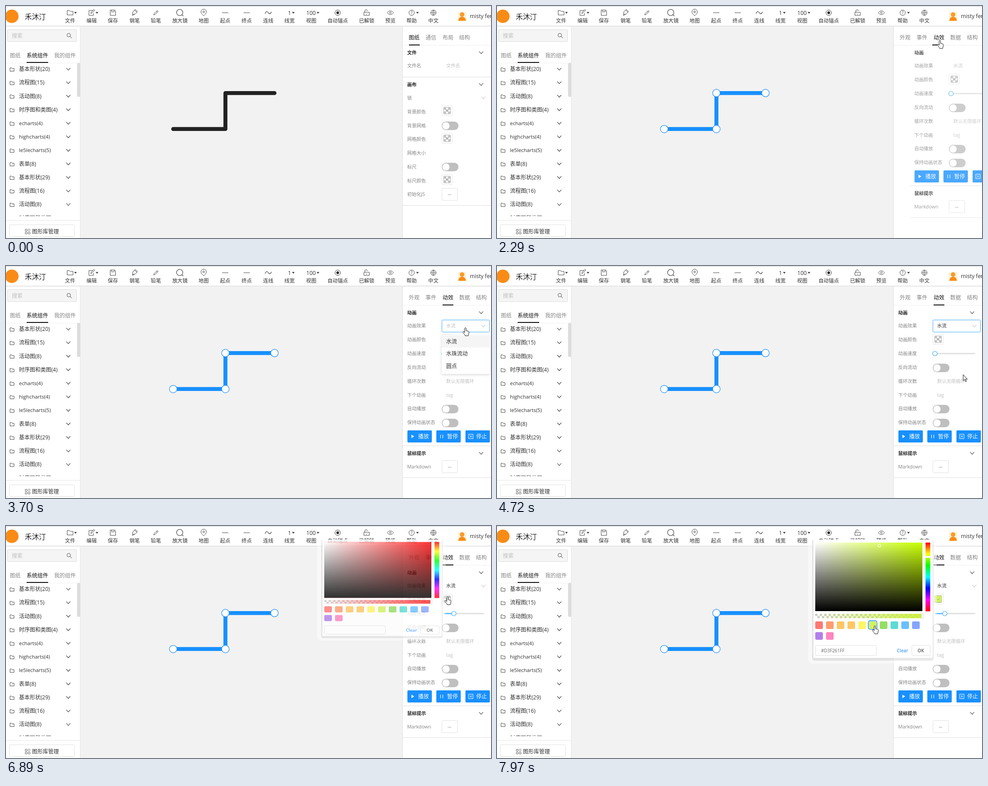
These frames come from a looping animation (1082x518 px, 8000 ms). An HTML page:

```html
<!DOCTYPE html>
<html lang="zh">
<head>
<meta charset="utf-8">
<title>Diagram editor</title>
<style>
html, body { margin: 0; width: 100%; height: 100%; overflow: hidden; background: #f2f2f2; }
svg { display: block; width: 1082px; height: 518px; }
text { font-family: "Open Sans", "Noto Sans CJK SC", "Noto Sans CJK", sans-serif; white-space: pre; }
</style>
</head>
<body>
<svg id="stage" viewBox="0 0 1082 518" xmlns="http://www.w3.org/2000/svg"></svg>
<script>
const INK = '#303030', LABEL = '#858585', FAINT = '#bfbfbf', BLUE = '#1890ff';
const LOOP = 8000;

// y is the visual middle of the text
const text = (x, y, str, size = 12, fill = INK, more = '') =>
  `<text x="${x}" y="${y + size * 0.37}" font-size="${size}" fill="${fill}" ${more}>${str}</text>`;
const mid = 'text-anchor="middle"';
const rect = (x, y, w, h, fill, more = '') =>
  `<rect x="${x}" y="${y}" width="${w}" height="${h}" fill="${fill}" ${more}/>`;
const line = (d, color = INK, width = 1, more = '') =>
  `<path d="${d}" fill="none" stroke="${color}" stroke-width="${width}" ${more}/>`;
const dot = (x, y, r, fill, more = '') => `<circle cx="${x}" cy="${y}" r="${r}" fill="${fill}" ${more}/>`;
const group = (id, body, more = '') => `<g id="${id}" ${more}>${body}</g>`;
const at = (x, y, body) => `<g transform="translate(${x} ${y})">${body}</g>`;
const border = (color, r = 2) => `stroke="${color}" rx="${r}"`;

const chevron = (x, y, color = INK) => line(`M${x - 4.5} ${y - 2.5}l4.5 5 4.5-5`, color, 1.1);
const caret = x => `<path d="M${x - 3} 13.5h6l-3 3.5z" fill="${INK}"/>`;
const folder = (x, y, w, h) =>
  line(`M${x - w / 2} ${y - h / 2}h${w * 0.38}l${w * 0.14} ${h * 0.2}h${w * 0.48}v${h * 0.8}h${-w}z`, '#444');

// ---------- header ----------
const icons = {
  file: folder(0, 0, 13, 10),
  edit: line('M3-5h-9V6h10V1M-2 2l1-3 6-6 2 1.5-6 6z', '#444'),
  save: line('M-6-6h10l2 2V6H-6zM-3-6v4h6v-4', '#444'),
  pen: line('M-5 6l1-8 4-4 5 5-4 4zM-5 6l4-4M0-6l2-1 4 4-1 2', '#444'),
  pencil: line('M-5 5l1-3 7-7 2 2-7 7zM1-3l2 2', '#444'),
  lens: dot(-0.5, -0.5, 7, 'none', 'stroke="#333" stroke-width="1.1"') + line('M4.5 4.5l3 3', '#333', 1.1),
  pin: line('M0 7C-4 3-6 1-6-2a6 6 0 0 1 12 0C6 1 4 3 0 7z', '#444') + dot(0, -2, 2, 'none', 'stroke="#444"'),
  dash: line('M-7 0H7', '#444'),
  wave: line('M-7 2C-4-5-2-3 0 0S5 4 7-2', '#333', 1.2),
  none: '',
  target: dot(0, 0, 6, 'none', 'stroke="#333"') + dot(0, 0, 3, '#222'),
  unlock: line('M-6-1H6V6H-6zM-4-1v-2a3 3 0 0 1 6-1M0 2v2', '#444'),
  eye: line('M-7 0Q0-9 7 0 0 9-7 0z', '#555') + dot(0, 0, 2, 'none', 'stroke="#555"'),
  help: dot(0, 0, 6, 'none', 'stroke="#444"') + text(0, 0, '?', 9, '#333', mid),
  globe: dot(0, 0, 6, 'none', 'stroke="#555"') + line('M-6 0H6M0-6V6M0-6Q-6 0 0 6 6 0 0-6', '#555', 0.8)
};
const tools = [
  [143, '文件', 'file', 155], [191, '编辑', 'edit', 203], [238.5, '保存', 'save'], [287, '钢笔', 'pen'],
  [334.5, '铅笔', 'pencil'], [388, '放大镜', 'lens'], [441, '地图', 'pin'], [489, '起点', 'dash'],
  [537, '终点', 'dash'], [585, '连线', 'wave'], [632.5, '线宽', 'none', 641], [681, '视图', 'none', 696],
  [740, '自动锚点', 'target'], [804.5, '已解锁', 'unlock'], [857.5, '预览', 'eye'],
  [905, '帮助', 'help', 918], [953.5, '中文', 'globe']
];
const header = rect(0, 0, 1082, 44, '#fff') + rect(0, 0, 1082, 1, '#c9c9c9') +
  rect(0, 44, 1082, 1, '#dedede') + rect(0, 45, 1082, 1, '#ebebeb') +
  dot(13, 23, 15, '#fa8c16') + text(42, 24, '禾沐汀', 15.7, '#1f1f1f') +
  tools.map(([x, name, icon, c]) =>
    at(x, 15, icons[icon]) + text(x, 33, name, 11.4, INK, mid) + (c ? caret(c) : '')).join('') +
  text(632.5, 15, '1', 12.2, INK, mid) + text(680.5, 15, '100', 12.2, INK, mid) +
  rect(1008, 13, 19, 21, '#fff3d9', 'rx="3"') + dot(1017.5, 19, 5, '#fa9a2b') +
  '<path d="M1009 33q1-9 8.5-9t8.5 9z" fill="#fa8c16"/>' +
  text(1035, 23, 'misty ferns', 12);

// ---------- left side ----------
const shapes = ['基本形状(20)', '流程图(15)', '活动图(8)', '时序图和类图(4)', 'echarts(4)', 'highcharts(4)',
  'le5lecharts(5)', '表单(8)', '基本形状(29)', '流程图(16)', '活动图(8)', '时序图和类图'];
const sidebar = rect(0, 45, 165, 473, '#fff') + rect(165, 45, 1, 473, '#e3e3e3') +
  rect(3.5, 52.5, 154, 27, '#f5f5f5', border('#dcdcdc')) + text(13, 67, '搜索', 12, FAINT) +
  dot(140, 65, 4, 'none', 'stroke="#555"') + line('M143 68l4 4', '#555') +
  text(8.5, 110.5, '图纸', 12, LABEL) + text(46, 110.5, '系统组件', 12, '#111', 'font-weight="500"') +
  text(107.5, 110.5, '我的组件', 12, LABEL) +
  rect(0, 127, 165, 1, '#f0f0f0') + rect(46, 125, 48, 2, '#111') +
  '<g clip-path="url(#listClip)">' + shapes.map((s, i) => {
    const y = 140.8 + 30.22 * i, size = /^[a-z]/.test(s) ? 11.4 : 12;
    return text(29, y, s, size) + (i < 11 ? folder(13.5, y + 1, 9, 7.5) + chevron(139, y) : '');
  }).join('') + '</g>' +
  rect(158.5, 127, 7, 76, '#dcdcdc', 'rx="3"') + rect(0, 478, 165, 1, '#e4e4e4') +
  rect(7.5, 488.5, 145, 26, '#fff', border('#e0e0e0')) +
  line('M43 498.5h4v4h-4zM43 505h4v4h-4zM49.5 505h4v4h-4zM51.5 497.5l2.5 2.8-2.5 2.8-2.5-2.8z', '#666') +
  text(58, 504, '图形库管理');

// ---------- right side ----------
const label = (y, s) => text(895, y, s, 10.4, LABEL);
const hint = (x, y, s) => text(x, y, s, 10.4, FAINT);
const head = (y, s, x = 1060) => text(895, y, s, 10.5, '#222', 'font-weight="700"') + chevron(x, y);
const rule = y => rect(885, y, 197, 1, '#dedede');
const more = y => rect(972.5, y - 13.5, 35, 27, '#fff', border('#e0e0e0')) + text(989.5, y - 2, '...', 10, '#444', mid);
const toggle = y => rect(972, y - 9, 37.5, 19, '#bfbfbf', 'rx="9.5"') + dot(981.5, y + 0.5, 8, '#fff');
const swatch = (x, y) => rect(x - 11.5, y - 12, 23, 23, '#fff', border('#e6e6e6')) +
  rect(x - 7.5, y - 8, 15, 15, '#fff', border('#b0b0b0', 1)) +
  [[-7, -7.5], [2, -7.5], [-7, 1.5], [2, 1.5], [-2.5, -3]].map(([a, b]) => rect(x + a, y + b, 5, 5, '#c4c4c4')).join('') +
  line(`M${x - 3} ${y - 2}l3 3 3-3`, '#8c8c8c');
const rowY = i => 133.6 + 30.83 * i;
const button = (x, icon, s) => rect(x, 367, 54.5, 27, BLUE, 'rx="2"') + at(x + 12, 380.5, icon) + text(x + 24, 380.5, s, 12, '#fff');

const pagePanel = head(104, '文件') + label(133.5, '文件名') + hint(982, 133.5, '文件名') + rule(158) +
  head(175, '画布') + chevron(1065, 205, FAINT) +
  ['锁', '背景颜色', '背景网格', '网格颜色', '网格大小', '标尺', '标尺颜色', '初始化JS']
    .map((s, i) => label(205.2 + 30.77 * i, s)).join('') +
  [234, 296, 388].map(y => swatch(984, y)).join('') + toggle(267) + toggle(359) + more(420.5) + rule(445);

const stylePanel = head(104, '样式', 1053) +
  ['线条样式', '末端样式', '连接样式', '线条渐变', '颜色', '浮动颜色', '选中颜色', '线条宽度', '背景',
    '背景颜色', '浮动背景颜色', '选中背景颜色', '透明度'].map((s, i) => label(rowY(i), s)).join('') +
  [0, 1, 2, 3, 8].map(i => chevron(1058, rowY(i) + 0.5, FAINT)).join('') +
  [4, 5, 6, 9, 10, 11].map(i => swatch(981, Math.round(rowY(i) - 1))).join('') +
  text(979, rowY(7), '10', 10.4) + hint(979, rowY(12), '(0-1)');

const motionPanel = head(104, '动画') +
  ['动画效果', '动画颜色', '动画速度', '反向流动', '循环次数', '下个动画', '自动播放', '保持动画状态']
    .map((s, i) => label(rowY(i), s)).join('') +
  rect(972.5, 120.5, 106, 27, '#fff', 'id="select" rx="2"') +
  `<g id="choice">${text(982, 133.5, '水流', 10.4, 'currentColor')}</g>` + chevron(1065, 134, FAINT) +
  swatch(984, 164) +
  group('picked', rect(976.5, 155.5, 15, 15, '#d3f261', border('#a9b877', 1)) + line('M981 162l3 3 3-3', '#98a95a')) +
  rect(977, 194, 90, 3, '#e1e1e1', 'rx="1.5"') + rect(977, 194, 0, 3, '#69c0ff', 'id="filled" rx="1.5"') +
  dot(977, 195.5, 5, '#fff', 'id="knob" stroke="#69c0ff" stroke-width="1.6"') +
  [3, 6, 7].map(i => toggle(Math.round(rowY(i) + 0.5))).join('') +
  hint(982, rowY(4), '默认无限循环') + hint(982, rowY(5), 'tag') +
  button(895.5, '<path d="M-3-4l6 4-6 4z" fill="#fff"/>', '播放') +
  button(960, line('M-2.5-4v8M2.5-4v8', '#fff', 1.2), '暂停') +
  button(1025, line('M-5-5H5V5H-5zM-2.5-2.5l5 5M2.5-2.5l-5 5', '#fff'), '停止') +
  rule(401) + head(418, '鼠标提示') + text(895, 448, 'Markdown', 10.8, LABEL) + more(448) + rule(472);

const tabX = [898.5, 936, 974, 1011, 1048.5];
const tabs = (id, names) => group(id, names.map((s, i) => text(tabX[i], 71, s, 12, LABEL, 'class="tab"')).join(''));
const aside = rect(885, 45, 197, 473, '#fff') + rect(884, 45, 1, 473, '#dedede') + rect(885, 87, 197, 1, '#f0f0f0') +
  tabs('pageTabs', ['图纸', '通信', '布局', '结构']) + tabs('lineTabs', ['外观', '事件', '动效', '数据', '结构']) +
  rect(899, 86, 24, 2, '#111', 'id="mark"') +
  group('panel0', pagePanel) + group('panel1', stylePanel) + group('panel2', motionPanel);

const dropdown = group('dropdown', rect(972, 153, 108, 88, '#fff', 'rx="2" filter="url(#soft)"') +
  rect(972, 154.5, 107, 27.5, '#f5f5f5') +
  ['水流', '水珠流动', '圆点'].map((s, i) => text(982, 168.5 + 27.4 * i, s)).join(''));

// ---------- drawn connector ----------
const nodes = [[373, 274.7], [489.5, 274.7], [489.5, 194.3], [599, 194.3]];
const connector = line('M' + nodes.join('L'), '#222', 8.8, 'id="wire" stroke-linecap="round" stroke-linejoin="round"') +
  group('anchors', nodes.map(([x, y]) => dot(x, y, 8.4, '#fff')).join(''), 'stroke-width="1.2"');

// ---------- colour picker ----------
const presets = ['#ff7875', '#ff9c6e', '#ffc766', '#ffc766', '#fff566', '#d3f261', '#95de64', '#5cdbd3',
  '#69c0ff', '#85a5ff', '#b37feb', '#ff85c0'];
const picker = group('picker',
  rect(694, 36, 287, 271, '#fff', 'rx="11" fill-opacity=".5"') +
  rect(703, 30, 271, 270.5, '#000', 'rx="5" fill-opacity=".09"') +
  rect(706, 30, 266, 264.5, '#fff', 'rx="2"') +
  rect(710, 37, 239, 153, '#f00', 'id="hueFill"') + rect(710, 37, 239, 153, 'url(#toWhite)') + rect(710, 37, 239, 153, 'url(#toBlack)') +
  dot(853, 44, 3, 'none', 'id="spot" stroke="#fff" stroke-width="1.2"') +
  rect(956, 37, 10.5, 153.5, 'url(#hues)') + rect(955, 67, 12.5, 4, '#fff', 'id="huePos" stroke="#ddd" stroke-width=".6" rx="1"') +
  rect(710, 196, 239, 10, 'url(#checks)') + rect(710, 196, 239, 10, 'url(#alpha)') +
  rect(947, 195, 4, 12, '#fff', 'stroke="#ccc" stroke-width=".7" rx="1"') +
  rect(828.5, 211.5, 19, 19, 'none', 'id="ring" stroke="#409eff" stroke-width="2" rx="4"') +
  presets.map((c, i) => rect(710 + 24 * (i % 10), i < 10 ? 213 : 237, 17, 17, c, 'rx="3"')).join('') +
  rect(710.5, 266.5, 136, 23, '#fff', border('#dedede', 3)) +
  group('hex', text(723, 278.5, '#D3F261FF', 10, '#666')) +
  text(892, 278.5, 'Clear', 10, '#409eff', 'font-weight="600"') +
  rect(925.5, 266.5, 41, 23, '#fff', border('#dedede', 3)) + text(945.5, 278.5, 'OK', 10, '#555', mid + ' font-weight="600"'));

const pointer = dot(0, 1.5, 10.5, '#f7ea1e', 'id="press" fill-opacity=".75"') +
  group('arrow', '<path d="M0 0v13.5l3-2.8 2.3 5 2-.9-2.2-4.8h4.2z"/>') +
  group('hand', '<path d="M-1.6 1.5a1.6 1.6 0 0 1 3.2 0v5l4.6 1q1.7.5 1.6 2.2l-.8 4.8q-.3 1.5-.8 3.3h-6.6q-.5-1.6-2-3.4l-3-4q-.7-1.3.4-1.9 1.2-.4 2.2.8l1.2 1.4z"/>');

const stops = list => list.map(([o, c, a = 1]) => `<stop offset="${o}" stop-color="${c}" stop-opacity="${a}"/>`).join('');
const gradient = (id, list, down) =>
  `<linearGradient id="${id}" ${down ? 'x2="0" y2="1"' : ''}>${stops(list)}</linearGradient>`;
const defs = '<defs>' +
  gradient('toWhite', [[0, '#fff'], [1, '#fff', 0]]) + gradient('toBlack', [[0, '#000', 0], [1, '#000']], true) +
  gradient('hues', [0, 1, 2, 3, 4, 5, 6].map(i => [i / 6, `hsl(${i * 60},100%,50%)`]), true) +
  '<linearGradient id="alpha"><stop offset="0" class="tint" stop-opacity="0"/><stop offset="1" class="tint"/></linearGradient>' +
  '<pattern id="checks" x="710" y="196" width="10" height="10" patternUnits="userSpaceOnUse">' +
  rect(0, 0, 10, 10, '#fff') + rect(0, 0, 5, 5, '#ccc') + rect(5, 5, 5, 5, '#ccc') + '</pattern>' +
  '<clipPath id="listClip"><rect y="128" width="165" height="341"/></clipPath>' +
  '<filter id="soft"><feDropShadow dx="0" dy="2" stdDeviation="3" flood-opacity=".15"/></filter></defs>';

const stage = document.getElementById('stage');
stage.innerHTML = defs + rect(0, 0, 1082, 518, '#f2f2f2') + connector + sidebar + aside + header + dropdown + picker +
  group('pointer', pointer, 'stroke-linejoin="round"');

const $ = id => document.getElementById(id);
const set = (id, attrs) => { for (const k in attrs) $(id).setAttribute(k, attrs[k]); };
const show = (id, on) => set(id, { visibility: on ? 'visible' : 'hidden' });
for (const id of ['arrow', 'hand']) set(id, { fill: '#fff', stroke: '#111', 'stroke-width': 1 });

// ---------- timing ----------
// bursts of change: first, last, count
const bursts = [[120, 810, 10], [960, 1280, 5], [1440, 2210, 11], [2290, 2540, 4], [2750, 3530, 11], [3610, 4370, 11],
  [4540, 5340, 11], [5420, 5490, 2], [5720, 5720, 1], [5880, 5950, 2], [6110, 6890, 11], [6980, 7740, 11], [7820, 7970, 3]];
const route = [[120, 963, 495], [350, 815, 378], [500, 720, 310], [640, 600, 262], [810, 550, 196], [1360, 550, 196],
  [1510, 825, 178], [1590, 974, 113], [1680, 975, 112], [2210, 988, 77], [2670, 988, 77], [3300, 1025, 138],
  [3840, 1025, 138], [4140, 1000, 170], [4460, 1000, 170], [4850, 1065, 288], [5340, 991, 198], [5490, 995, 194],
  [5720, 995, 194], [5880, 998, 193], [6030, 998, 193], [6650, 985, 158], [6900, 985, 158], [7740, 843, 223]];
const handTimes = [[2140, 2800], [3050, 4550], [5280, 6150], [6500, 6990], [7650, LOOP]];
const pressTimes = [[960, 1110], [2130, 2290], [3380, 3520], [4140, 4280], [5880, 6110], [6740, 6890], [7820, 7960]];
const within = (t, spans) => spans.some(([a, b]) => t >= a && t < b);

function hold(t) {
  let last = 0;
  for (const [a, b, n] of bursts) {
    for (let i = 0; i < n; i++) {
      const step = Math.floor((a + (n > 1 ? (b - a) * i / (n - 1) : 0)) / 10 + 1e-6) * 10;
      if (step <= t) last = step;
    }
  }
  return last;
}

function place(t) {
  const i = route.findIndex(p => p[0] > t);
  if (i < 0) return route[route.length - 1].slice(1);
  if (i === 0) return route[0].slice(1);
  const [a, x, y] = route[i - 1], [b, u, v] = route[i];
  const k = (t - a) / (b - a);
  return [x + (u - x) * k, y + (v - y) * k];
}

function draw(time) {
  const t = hold(time);

  const hover = t >= 730 && t < 1440, selected = t >= 1030;
  set('wire', { stroke: hover ? '#69b1ff' : selected ? BLUE : '#222' });
  set('anchors', { stroke: selected ? BLUE : '#69b1ff' });
  show('anchors', hover || selected);

  const page = t < 1110 ? 0 : t < 2210 ? 1 : 2;
  [0, 1, 2].forEach(i => set('panel' + i, { display: i === page ? 'inline' : 'none' }));
  show('pageTabs', page === 0);
  show('lineTabs', page > 0);
  document.querySelectorAll('.tab').forEach(el => {
    const i = [...el.parentNode.children].indexOf(el);
    el.setAttribute('fill', i === (page === 2 ? 2 : 0) ? '#111' : LABEL);
  });
  const late = Math.max(0, Math.min(1, (2540 - t) / 250));
  set('panel2', { transform: `translate(${36 * late * late} 0)`, opacity: t < 2290 ? 0 : 1 - 0.22 * late });
  set('mark', { x: page < 2 ? 899 : t < 2290 ? 940 : 974 - 3 * late });

  set('select', { stroke: t >= 3050 && t < 6740 ? '#40a9ff' : 'none' });
  set('choice', { color: t < 4280 ? FAINT : INK });
  const open = t >= 3530 && t < 4370, full = t >= 3610 && t < 4290;
  show('dropdown', open);
  set('dropdown', { opacity: full ? 1 : 0.5, transform: `translate(0 153) scale(1 ${full ? 1 : 0.85}) translate(0 -153)` });

  const knob = t < 5880 ? 977 : 999;
  set('knob', { cx: knob });
  set('filled', { width: knob - 977 });

  const chosen = t >= 7890, grown = t >= 6980;
  show('picker', t >= 6890);
  set('picker', { opacity: grown ? 1 : 0.8, transform: `translate(0 30) scale(1 ${grown ? 1 : 0.815}) translate(0 -30)` });
  set('hueFill', { fill: chosen ? '#c8ff00' : '#f00' });
  document.querySelectorAll('.tint').forEach(el => el.setAttribute('stop-color', chosen ? '#c9f03f' : '#ff2020'));
  for (const id of ['spot', 'huePos', 'ring', 'hex', 'picked']) set(id, { display: chosen ? 'inline' : 'none' });

  const [x, y] = place(t), hand = within(t, handTimes);
  set('pointer', { transform: `translate(${x} ${y})`, display: t >= 120 ? 'inline' : 'none' });
  set('hand', { display: hand ? 'inline' : 'none' });
  set('arrow', { display: hand ? 'none' : 'inline' });
  set('press', { display: within(t, pressTimes) ? 'inline' : 'none' });
}

const start = performance.now();
function tick() {
  draw((performance.now() - start) % LOOP);
  requestAnimationFrame(tick);
}
tick();
</script>
</body>
</html>
```
